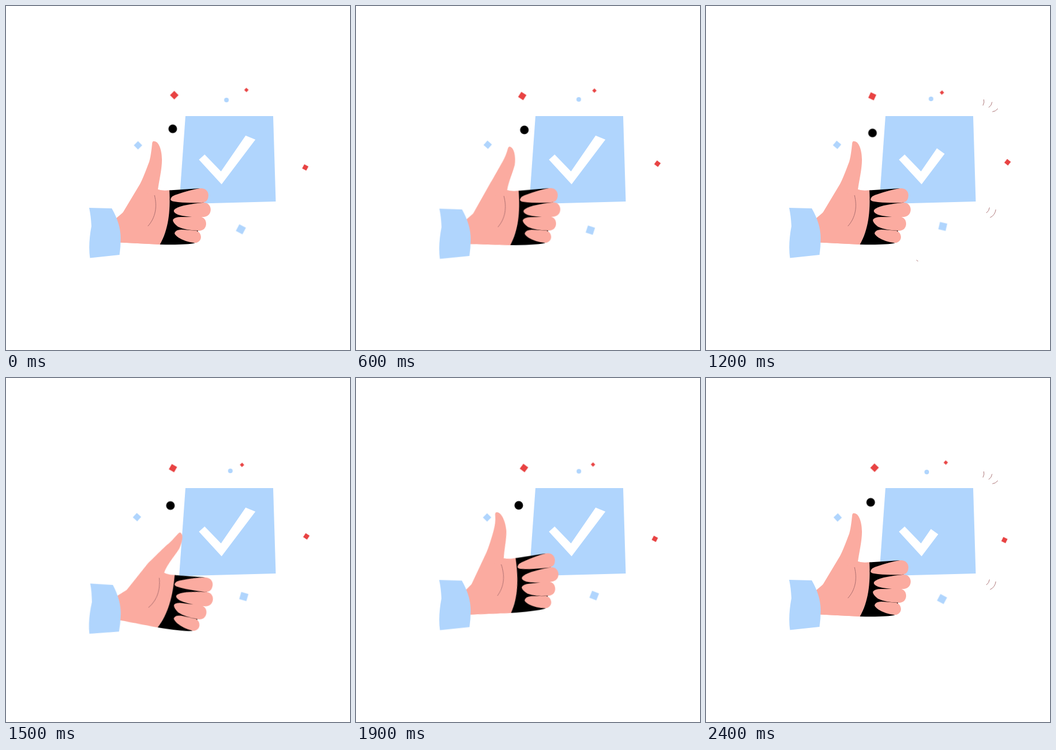
Recreate the animation shown at these times as an HTML page without scripts. Size 600x600 px, loop 2500 ms.

```html
<!DOCTYPE html>
<html lang="en">
<head>
<meta charset="utf-8">
<title>Thumbs up</title>
<style>
html, body { margin: 0; width: 100%; height: 100%; overflow: hidden; background: #fff; }
svg { display: block; width: 100vw; height: 100vh; }

.blue { fill: #b0d5fd; }
.red { fill: #e84343; }
.skin { fill: #fbaba0; }
.line { fill: none; stroke: #a4686a; stroke-width: .9; }

/* tap cycle: twice per loop; confetti: once per loop */
.hand, .sleeve, .thumb, .draw, .curl, .spark { animation: 1250ms linear infinite; }
.bit, .tail { animation: 2500ms linear infinite; }

.hand { transform-origin: 195px 392px; animation-name: tap; }
.sleeve { transform-origin: 170px 396px; animation-name: push; }
.thumb { animation-name: bend; }

@keyframes tap {
  0%, 8% { transform: translate(0, 0) rotate(0deg); animation-timing-function: ease-in-out; }
  29% { transform: translate(.4px, 14.4px) rotate(12.8deg); }
  32% { transform: translate(.4px, 13.9px) rotate(12.5deg); }
  36% { transform: translate(.5px, 9.5px) rotate(11.3deg); animation-timing-function: cubic-bezier(.35, .15, .5, 1); }
  60% { transform: translate(0, -1px) rotate(-8deg); }
  64% { transform: translate(0, -1px) rotate(-7deg); }
  68% { transform: translate(0, -.5px) rotate(-3.4deg); animation-timing-function: ease-out; }
  74%, 100% { transform: translate(0, 0) rotate(0deg); }
}
@keyframes push {
  0%, 8% { transform: translate(0, 0) rotate(0deg); animation-timing-function: ease-in-out; }
  29% { transform: translate(.7px, 11.8px) rotate(3.1deg); }
  32% { transform: translate(.7px, 11.3px) rotate(3deg); }
  36% { transform: translate(.5px, 8px) rotate(2deg); animation-timing-function: cubic-bezier(.35, .15, .5, 1); }
  56%, 100% { transform: translate(0, 0) rotate(0deg); }
}
@keyframes bend {
  0%, 8%, 74%, 100% {
    d: path("M285 322Q274 323 265 320C267 304 272 285 272 268C272 250 266 235 258 236Q256 235 255 239C254 250 252 265 250 271C246 282 238 303 234 310L204 360Q199 367 190 372L190 412L269 416Z");
  }
  8% { animation-timing-function: ease-in-out; }
  29%, 32% {
    d: path("M285 322Q274 323 267 320C270 308 284 295 297 280C303 273 309 263 307 257Q305 252 301 255C292 260 283 267 275 271C262 282 246 297 238 305L204 363Q199 368 190 372L190 412L269 416Z");
  }
  36% {
    d: path("M285 322Q274 323 267 320C270 310 284 301 298 286C306 279 313 271 311 264Q310 259 305 261C295 265 286 270 278 275C263 283 246 298 238 306L204 363Q199 368 190 372L190 412L269 416Z");
    animation-timing-function: cubic-bezier(.35, .15, .5, 1);
  }
  60%, 64% {
    d: path("M285 322Q274 323 264 320C266 304 270 286 269 271C268 254 261 237 253 235Q248 234 248 239C250 250 249 260 247 268C245 280 238 301 235 307L204 360Q199 366 190 371L190 412L269 416Z");
  }
}

.draw { stroke-dasharray: 152 200; animation-name: draw; }
@keyframes draw {
  0%, 71% { stroke-dashoffset: 0; }
  71.1% { stroke-dashoffset: 152; }
  92% { stroke-dashoffset: 58; }
  96% { stroke-dashoffset: 40; }
  100% { stroke-dashoffset: 0; }
}

/* a stroke that runs along its path: gap, then visible part */
.curl { animation-name: run; }
@keyframes run {
  0%, 24% { stroke-dasharray: 0 0 0 300; }
  32% { stroke-dasharray: 0 0 78 300; }
  36% { stroke-dasharray: 0 22 78 300; }
  44%, 100% { stroke-dasharray: 0 100 0 300; }
}
.tail { animation-name: tail; }
@keyframes tail {
  0%, 28% { stroke-dasharray: 0 0 0 300; }
  32% { stroke-dasharray: 0 0 46 300; }
  34% { stroke-dasharray: 0 12 63 300; }
  40% { stroke-dasharray: 0 75 25 300; }
  48% { stroke-dasharray: 0 93 7 300; }
  50% { stroke-dasharray: 0 100 0 300; }
  50.1%, 78% { stroke-dasharray: 0 0 0 300; }
  82% { stroke-dasharray: 0 0 46 300; }
  84% { stroke-dasharray: 0 12 63 300; }
  88% { stroke-dasharray: 0 50 50 300; }
  92%, 100% { stroke-dasharray: 0 100 0 300; }
}
.spark { stroke-dasharray: 0 300; animation-name: spark; }
@keyframes spark {
  0%, 84% { stroke-dasharray: 0 300; }
  90%, 97% { stroke-dasharray: 100 300; }
  99%, 100% { stroke-dasharray: 0 300; }
}

@keyframes big {
  0%, 100% { transform: translate(293.5px, 155.5px) rotate(45deg); }
  16% { transform: translate(291px, 156.5px) rotate(37deg); }
  32% { transform: translate(289px, 157.5px) rotate(28deg); }
  48% { transform: translate(290px, 157.5px) rotate(25deg); }
  68% { transform: translate(292px, 157px) rotate(33deg); }
  84% { transform: translate(294px, 157px) rotate(41deg); }
  96% { transform: translate(294px, 156.5px) rotate(44deg); }
}
@keyframes small {
  0%, 100% { transform: translate(419.3px, 146.4px) rotate(42deg); }
  16% { transform: translate(417.7px, 146.5px) rotate(45deg); }
  32% { transform: translate(414px, 148.7px) rotate(48deg); }
  48% { transform: translate(411.5px, 151px) rotate(50deg); }
  68% { transform: translate(411.8px, 151.8px) rotate(48deg); }
  84% { transform: translate(415px, 150px) rotate(44deg); }
  96% { transform: translate(418.2px, 147.5px) rotate(42deg); }
}
@keyframes side {
  0%, 100% { transform: translate(522px, 281.6px) rotate(28deg); }
  16% { transform: translate(524.5px, 277.6px) rotate(34deg); }
  32% { transform: translate(527px, 272.5px) rotate(40deg); }
  48% { transform: translate(526px, 272.5px) rotate(38deg); }
  68% { transform: translate(522.5px, 278.7px) rotate(30deg); }
  84% { transform: translate(520px, 282.4px) rotate(25deg); }
  96% { transform: translate(520.5px, 282.7px) rotate(26deg); }
}
@keyframes dot {
  0%, 100% { transform: translate(384.5px, 164px); }
  16% { transform: translate(386.5px, 163.4px); }
  32% { transform: translate(390.5px, 162.4px); }
  48% { transform: translate(392.5px, 162px); }
  68% { transform: translate(390.5px, 162px); }
  84% { transform: translate(387px, 163.4px); }
  96% { transform: translate(385px, 164px); }
}
@keyframes ball {
  0%, 100% { transform: translate(290.8px, 214.2px); }
  16% { transform: translate(293.3px, 214.7px); }
  32% { transform: translate(294px, 217.5px); }
  48% { transform: translate(290.4px, 221.4px); }
  68% { transform: translate(284.4px, 223.2px); }
  84% { transform: translate(283.3px, 221px); }
  96% { transform: translate(287.2px, 216.8px); }
}
@keyframes left {
  0%, 100% { transform: translate(230.3px, 243px) rotate(45deg); }
  16% { transform: translate(230.2px, 242.3px) rotate(43deg); }
  32% { transform: translate(229.3px, 241.7px) rotate(40deg); }
  48% { transform: translate(228.6px, 242.2px) rotate(40deg); }
  68% { transform: translate(228.4px, 243px) rotate(43deg); }
  84% { transform: translate(228.9px, 243.4px) rotate(46deg); }
  96% { transform: translate(229.7px, 243.3px) rotate(47deg); }
}
@keyframes low {
  0%, 100% { transform: translate(409.7px, 389.5px) rotate(28deg); }
  16% { transform: translate(408px, 392px) rotate(21deg); }
  32% { transform: translate(409.5px, 390px) rotate(15deg); }
  48% { transform: translate(413px, 384.5px) rotate(13deg); }
  68% { transform: translate(416px, 379px) rotate(18deg); }
  84% { transform: translate(415px, 380px) rotate(25deg); }
  96% { transform: translate(411.7px, 385.5px) rotate(28deg); }
}
</style>
</head>
<body>
<svg viewBox="0 0 600 600">
  <mask id="reveal" maskUnits="userSpaceOnUse" x="300" y="190" width="180" height="160">
    <path class="draw" d="M338 260L375.5 300L432 222" fill="none" stroke="#fff" stroke-width="30" stroke-miterlimit="10"/>
  </mask>

  <path class="blue" d="M313 192H466L470.500 341L302 345.500Z"/>
  <path fill="#fff" mask="url(#reveal)" d="M346.500 259L375 288.500L418 226L435 233L376 311L336.500 268Z"/>

  <rect class="bit red" style="animation-name:big" x="-5.300" y="-5.300" width="10.600" height="10.600"/>
  <rect class="bit red" style="animation-name:small" x="-2.700" y="-2.700" width="5.400" height="5.400"/>
  <rect class="bit red" style="animation-name:side" x="-4.100" y="-4.100" width="8.200" height="8.200"/>
  <circle class="bit blue" style="animation-name:dot" r="4"/>
  <circle class="bit" style="animation-name:ball" r="7.500"/>
  <rect class="bit blue" style="animation-name:left" x="-5.200" y="-5.200" width="10.400" height="10.400"/>
  <rect class="bit blue" style="animation-name:low" x="-6.500" y="-6.500" width="13" height="13"/>

  <path class="line curl" pathLength="100" d="M221 191C228 181 240 179 245 185C249 191 243 193 240.500 187C239 184 240 181 240 178"/>
  <path class="line tail" pathLength="100" d="M336 434.500C346 431 354 437 355 445C355 450 350 449 351.500 444.500C353 441 355 440 358 441C362 441 367 442 370 445.500"/>
  <g class="line">
    <path class="spark" pathLength="100" d="M484.500 163Q486 168 483 173.500"/>
    <path class="spark" pathLength="100" d="M499 167.500Q498 174 493 177"/>
    <path class="spark" pathLength="100" d="M509 179Q505 184 499.500 184.500"/>
    <path class="spark" pathLength="100" d="M494.500 351.500Q494 357 489 361"/>
    <path class="spark" pathLength="100" d="M505.500 355Q504 365 495.500 369"/>
  </g>

  <g class="hand">
    <path class="skin thumb" d="M285 322Q274 323 265 320C267 304 272 285 272 268C272 250 266 235 258 236Q256 235 255 239C254 250 252 265 250 271C246 282 238 303 234 310L204 360Q199 367 190 372L190 412L269 416Z"/>
    <path class="skin" d="M264 320Q274 323 287 321L284 380L269 416L190 412V372L240 330Z"/>
    <path d="M285 321.500L338 318L345 345L340 370L335 392L329 413.500Q315 417 268.500 416C283 390 287 360 285 321.500Z"/>
    <g class="skin">
      <path d="M287 337Q288 331 300 328Q320 321 338 318C348 317 353 323 353 330C353 338 349 343 341 343Q310 344 293 341Q287 340 287 337Z"/>
      <path d="M293 356Q297 351 310 348Q330 344 343 343C352 342 357 348 357 355C357 363 351 368 344 368Q315 369 300 364Q291 360 293 356Z"/>
      <path d="M291 373Q294 368 305 368Q325 368 340 368C346 369 349 374 349 380C349 387 344 392 337 392Q312 391 300 385Q291 378 291 373Z"/>
      <path d="M294 396Q296 390 306 390Q322 391 332 392C338 394 340 399 340 403C340 409 335 414 328 413Q312 411 301 404Q294 399 294 396Z"/>
    </g>
    <path class="line" d="M259 330C264 350 261 369 247.500 384"/>
  </g>
  <path class="blue sleeve" d="M145 352L184.500 353Q200 380 200 405Q200 420 198 434L146.500 439.500Q143 416 149 384Q148 365 145 352Z"/>
</svg>
</body>
</html>
```
